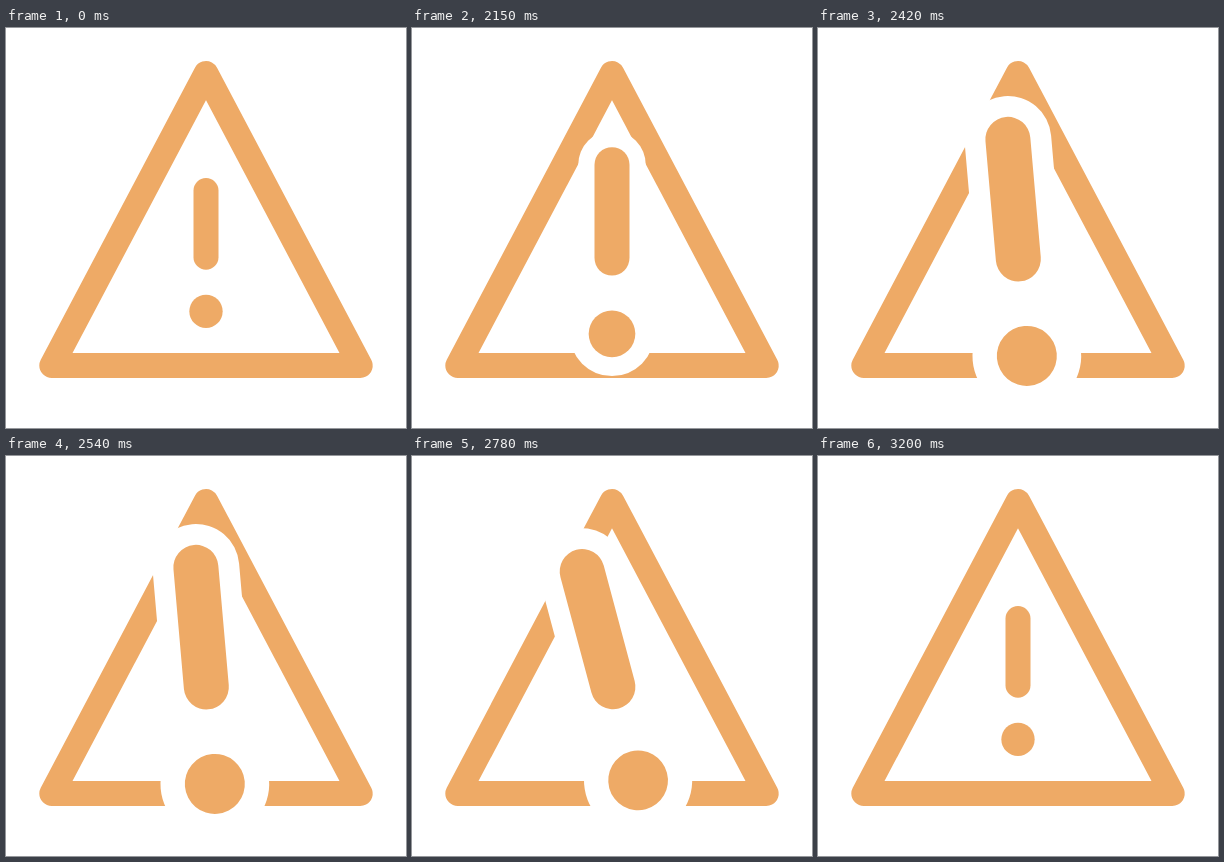
Animation, 400 px wide and 400 px high, one loop 3230 ms. Source, as an HTML page:

```html
<!DOCTYPE html>
<html lang="en">
<head>
<meta charset="utf-8">
<title>Warning sign</title>
<style>
  html, body { margin: 0; width: 100%; height: 100%; overflow: hidden; background: #fff; }
  svg { display: block; width: 100vw; height: 100vh; }
  .line { fill: none; stroke: #eeaa66; stroke-width: 25; stroke-linecap: round; stroke-linejoin: round; }
  .gap { stroke: #fff; stroke-width: 48.2; }
  .dot { fill: #eeaa66; }
  .hole { fill: #fff; }
</style>
</head>
<body>
<svg viewBox="0 0 400 400">
  <path class="line" d="M200 45.5L354.2 337.5H45.8Z"/>
  <!-- origin of the mark is its pivot -->
  <g id="mark">
    <path class="line gap" d="M0-64.5V2.2"/>
    <circle class="hole" cy="56.3" r="30.2"/>
    <path class="line" d="M0-64.5V2.2"/>
    <circle class="dot" cy="56.3" r="16.67"/>
  </g>
</svg>
<script>
  const LOOP = 3230, REST = 2000, STEP = 30;
  // [step, value] pairs, eased in and out between neighbours
  const SCALE = [[0, 1], [10, 1.8], [25, 1.8], [40, 1]];
  const TILT = [[8, 0], [12, -30], [16, 20], [20, -30], [32, 0]];
  const mark = document.getElementById('mark');

  const ease = x => (1 - Math.cos(Math.PI * x)) / 2;

  function valueAt(keys, n) {
    if (n <= keys[0][0]) return keys[0][1];
    for (let i = 1; i < keys.length; i++) {
      const [a, from] = keys[i - 1], [b, to] = keys[i];
      if (n <= b) return from + (to - from) * ease((n - a) / (b - a));
    }
    return keys[keys.length - 1][1];
  }

  function draw(ms) {
    const n = Math.max(0, Math.floor((ms % LOOP - REST) / STEP));
    const scale = valueAt(SCALE, n), tilt = valueAt(TILT, n);
    mark.setAttribute('transform', `translate(200 227) rotate(${tilt}) scale(${scale})`);
  }

  const start = performance.now();
  function tick() {
    draw(performance.now() - start);
    requestAnimationFrame(tick);
  }
  tick();
</script>
</body>
</html>
```
